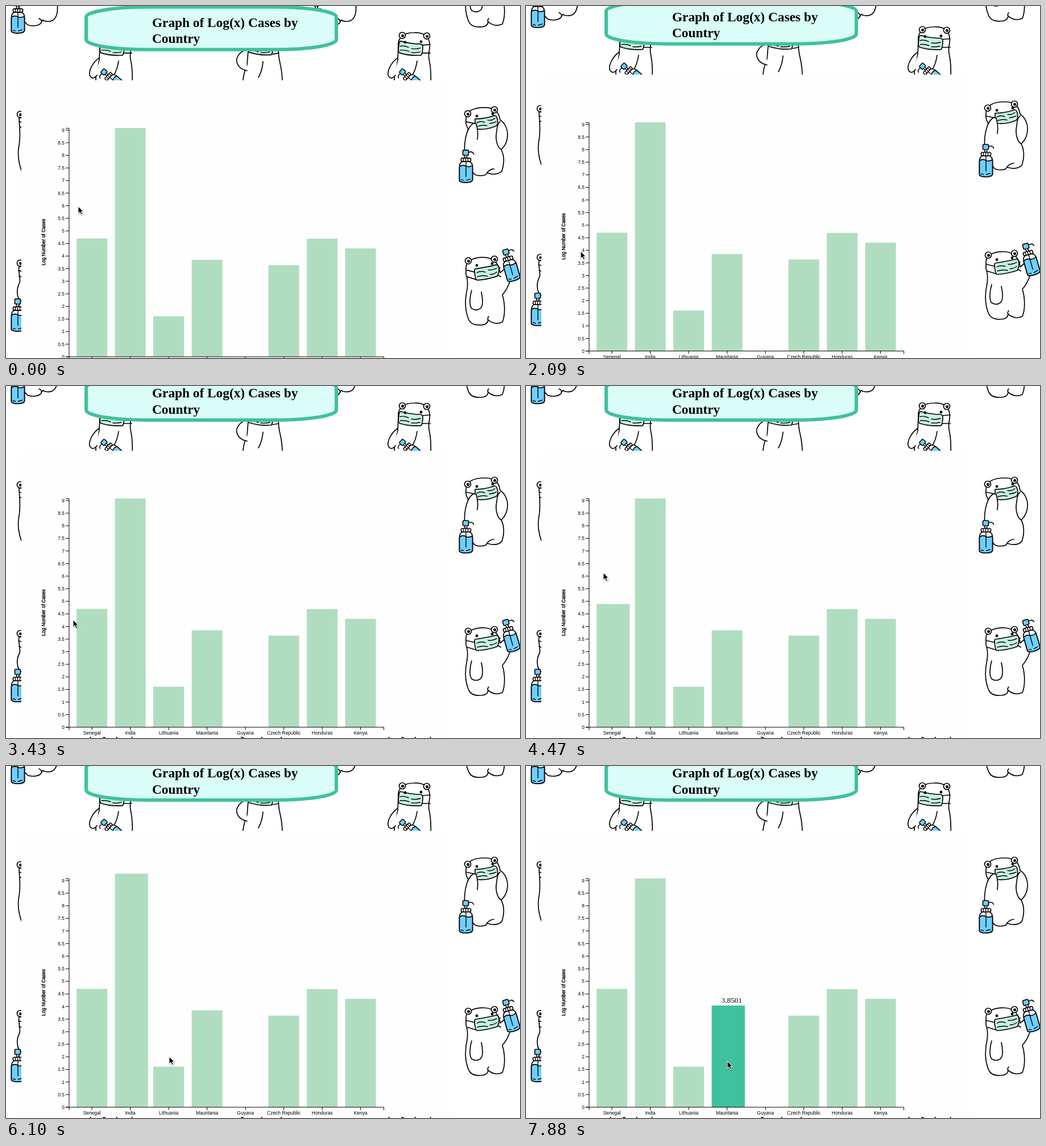
An HTML page for the animation above (8000 ms loop, 904 px wide and 620 px high).

```html
<!DOCTYPE html>
<html lang="en">
<head>
<meta charset="utf-8">
<title>Log cases by country</title>
<style>
  html, body { margin: 0; width: 100%; height: 100%; overflow: hidden; background: #fff; }
  svg { display: block; width: 904px; height: 620px; }
  .ink { fill: #fff; stroke: #000; stroke-width: 1.7; stroke-linecap: round; stroke-linejoin: round; }
  .line { fill: none; }
  .fold { fill: none; stroke-width: 1.4; }
  .blue { fill: #6fcfff; }
  .mask { fill: #c6f0df; }
  .dot { fill: #000; stroke: none; }
  .axis { fill: none; stroke: #000; stroke-width: 1; }
  .small { font: 8.43px "Liberation Sans", Arial, sans-serif; }
  .title { font: bold 23.3px "Liberation Serif", serif; }
  .value { font: 13.3px "Liberation Serif", "Times New Roman", serif; }
  .bold { stroke: #000; stroke-width: .4; }
</style>
</head>
<body>
<svg viewBox="0 0 904 620">
  <defs>
    <g id="bottle" class="ink">
      <path class="line" d="M17 4Q24 1 26 7"/>
      <rect class="blue" x="7" y="0" width="10" height="9" rx="1.500"/>
      <path d="M10.500 9V15H14V9"/>
      <path d="M1 31Q1 21 7 20H18Q24 21 24 31V52Q24 57 12 57T1 52Z"/>
      <path class="blue" d="M1 29Q6 25 12 28T24 27V52Q24 57 12 57T1 52Z"/>
      <rect x="4" y="14" width="17" height="6" rx="2"/>
      <path class="fold" d="M8 15V19M12 15V19M16 15V19M12.500 20V47M4 52L8 53M13 53L20 51"/>
    </g>

    <g id="ear">
      <circle r="5.500"/>
      <circle class="dot" r="2.500" cx=".6" cy=".6"/>
    </g>

    <!-- hands over the mask -->
    <g id="shy" class="ink">
      <path d="M809 184C808 166 826 162 842 162C860 162 867 170 869 184C878 189 883 202 882 212C881 226 875 232 871 236C877 248 876 262 872 274Q862 283 846 277Q845 282 834 282Q824 282 821 276L808 250C804 228 809 210 813 200Q808 192 809 184Z"/>
      <path class="line" d="M809 187L824 190M846 277Q850 271 858 270"/>
      <path class="mask" d="M825 182Q843 182 859 176Q863 176 864 182Q866 190 863 194Q846 202 829 200Q826 199 825 194Z"/>
      <path class="fold" d="M828 189Q834 185 842 188M847 184Q853 186 860 181M830 195Q838 192 846 194M850 190Q856 190 862 187"/>
      <path d="M812 203Q820 186 827 191Q831 205 829 218"/>
      <path d="M871 236C864 232 860 218 863 204Q864 190 869 187"/>
      <circle class="dot" cx="828" cy="177" r="2.400"/>
      <circle class="dot" cx="856" cy="173" r="2.400"/>
      <use href="#ear" x="812" y="173"/>
      <use href="#ear" x="859" y="166"/>
      <use href="#bottle" x="796.500" y="237"/>
    </g>

    <!-- raised bottle -->
    <g id="cheer" class="ink">
      <path d="M809 445C808 430 828 425 842 426C860 427 868 440 869 453L876 447L887 466Q882 482 873 492C878 508 878 528 873 540Q860 546 848 536Q847 545 834 545Q819 546 814 536C807 520 807 500 811 482Q813 466 809 456Z"/>
      <path class="line" d="M809 448L825 452M811 460L827 465M866 446L869 444M865 457L870 460M848 536Q846 533 849 530M819 484C816 494 814 510 819 516Q827 521 834 516Q841 511 836 487"/>
      <path class="mask" d="M826 446Q846 443 862 439Q866 439 867 445Q867 455 864 459Q846 465 829 466Q825 466 824 450Q824 446 826 446Z"/>
      <path class="fold" d="M828 453Q835 449 843 452M848 448Q855 449 863 445M829 460Q838 457 847 459M851 456Q858 456 863 452"/>
      <circle class="dot" cx="828" cy="440" r="2.400"/>
      <circle class="dot" cx="855" cy="437" r="2.400"/>
      <use href="#ear" x="813" y="432"/>
      <use href="#ear" x="859" y="429"/>
      <use href="#bottle" transform="translate(879 416) rotate(-16) translate(-12 -4)"/>
    </g>

    <!-- bottle in the lap -->
    <g id="lap" class="ink">
      <path d="M690 55C688 38 700 30 718 30C740 29 747 42 745 58Q742 70 745 82Q748 98 747 120H683Q682 98 689 78Z"/>
      <path d="M688 75C676 84 669 100 673 107Q678 114 685 105"/>
      <path class="line" d="M733 52L746 51M731 66L746 66M723 80Q721 95 714 106"/>
      <path class="mask" d="M694 45Q712 50 729 50Q733 51 733 55Q733 66 730 70Q708 71 693 66Q690 65 690 60Q691 45 694 45Z"/>
      <path class="fold" d="M693 54Q700 52 708 56M713 58Q720 60 729 57M693 61Q701 60 709 63M713 65Q720 66 728 64"/>
      <circle class="dot" cx="702" cy="47" r="2.400"/>
      <circle class="dot" cx="730" cy="46" r="2.400"/>
      <use href="#ear" x="697" y="35"/>
      <use href="#ear" x="740" y="36"/>
      <use href="#bottle" transform="translate(697 99) rotate(-48) scale(-.9 .9) translate(-12 -4)"/>
    </g>

    <g id="wave" class="ink">
      <path d="M427 50C426 35 440 30 452 30C470 30 480 40 479 58Q479 72 482 84Q486 100 486 120H416Q418 100 424 86Z"/>
      <path d="M422 61C410 63 404 76 406 82Q409 94 424 97"/>
      <path class="line" d="M452 81Q451 96 444 109M469 68L480 66"/>
      <path class="mask" d="M427 48Q448 52 469 50Q471 60 467 69Q446 71 426 64Z"/>
      <path class="fold" d="M430 61Q437 61 444 64M448 65Q456 66 464 64"/>
    </g>

    <g id="stand" class="ink">
      <path d="M23 442C21 450 26 464 24 470C18 482 19 492 23 500C22 515 25 530 35 538Q38 543 47 543Q61 543 63 535Q66 531 66 534Q86 540 90 520C93 500 84 470 82 440Z"/>
      <path class="line" d="M22 449L34 452M23 459L34 462M63 535Q61 531 58 530"/>
      <use href="#ear" x="25" y="436"/>
      <use href="#bottle" x="8.500" y="499"/>
    </g>

    <g id="side" class="ink">
      <path d="M23 180C24 200 26 215 22 235Q20 255 28 275H80V180Z"/>
      <path class="line" d="M23 187L34 189M24 196L34 198"/>
      <use href="#ear" x="25" y="174"/>
    </g>

    <g id="tile">
      <use href="#shy"/><use href="#cheer"/><use href="#lap"/>
      <use href="#wave"/><use href="#stand"/><use href="#side"/>
    </g>

    <filter id="shade" x="-50%" y="-50%" width="220%" height="220%">
      <feDropShadow dx=".5" dy="1.2" stdDeviation="1" flood-opacity=".35"/>
    </filter>
  </defs>

  <g id="page">
    <g id="paper"></g>
    <rect x="27" y="114" width="753" height="504" fill="#fefefe"/>
    <rect x="141" y="-15" width="440" height="75" rx="108" ry="17.500"
      fill="#dafdf7" stroke="#3fc19e" stroke-width="6"/>
    <text class="title" x="257" y="20">Graph of Log(x) Cases by</text>
    <text class="title" x="257" y="48.500">Country</text>
    <g id="bars"></g>
    <g id="axes"></g>
    <text class="small bold" text-anchor="middle" transform="translate(69 399) rotate(-90)">Log Number of Cases</text>
  </g>
  <path id="cursor" filter="url(#shade)" fill="#000" stroke="#fff" stroke-width="1"
    d="M0 0V12.500L3 9.800L5.200 14.600L7.400 13.600L5.300 9H9.200Z"/>
</svg>

<script>
const LOOP = 8000, TICK = 148.65, BASE = 601, UNIT = 44.35, STEP = 67.5, SCROLL = 3.37;
const GROW = 400 / TICK;
const PALE = '#b0ddbf', STRONG = '#3fc19e';

const data = [['Senegal', 4.7005], ['India', 9.0851], ['Lithuania', 1.6094], ['Mauritania', 3.8501],
  ['Guyana', 0], ['Czech Republic', 3.6376], ['Honduras', 4.6913], ['Kenya', 4.3041]];

// hover [enter, leave] per bar, in ticks
const hovers = [[24.3, 29.9], [34.3, 40.9], [43.3, 49.5], [50.2, 99]];
const scrollTicks = [8, 12, 14, 16, 18];
// pointer path: tick, x, y
const path = [[0, 127, 353], [8, 96, 432], [22, 96, 432], [23, 118, 412], [25, 138, 418], [27, 141, 425],
  [28, 141, 425], [29, 139, 394], [30, 136, 329], [32, 168, 330], [34, 193, 372], [36, 219, 440],
  [38, 219, 440], [39, 222, 455], [40, 243, 490], [41, 287, 512], [43, 287, 529], [45, 287, 560],
  [47, 287, 560], [49, 314, 548], [50, 324, 540], [52, 352, 523], [53, 354, 520]];

const $ = id => document.getElementById(id);
function add(parent, tag, attrs, text) {
  const el = document.createElementNS('http://www.w3.org/2000/svg', tag);
  for (const k in attrs) el.setAttribute(k, attrs[k]);
  if (text !== undefined) el.textContent = text;
  return parent.appendChild(el);
}

for (const y of [-525, 0, 525])
  for (const x of [-525, 0, 525]) add($('paper'), 'use', { href: '#tile', x, y });

const bars = data.map(([name, value], i) => {
  const x = 124.1 + i * STEP, mid = x + 27;
  add($('axes'), 'path', { class: 'axis', d: `M${mid} ${BASE}v5` });
  add($('axes'), 'text', { class: 'small', x: mid, y: 614, 'text-anchor': 'middle' }, name);
  const rect = add($('bars'), 'rect', { x });
  const label = add($('bars'), 'text',
    { class: 'value', x: x + 17, y: BASE - value * UNIT - 13 }, value.toFixed(4));
  return { rect, label, value };
});

add($('axes'), 'path', { class: 'axis', d: 'M105 198.500H111V601H105M111 606V601H664.500V606' });
for (let i = 0; i <= 18; i++) {
  const y = BASE - i * UNIT / 2;
  add($('axes'), 'path', { class: 'axis', d: `M105 ${y}h6` });
  add($('axes'), 'text', { class: 'small', x: 103, y: y + 3, 'text-anchor': 'end' }, i / 2);
}

const clamp = v => Math.min(1, Math.max(0, v));
const ease = v => v < .5 ? 4 * v ** 3 : 1 - 4 * (1 - v) ** 3;

function pointer(k) {
  const n = path.findIndex(p => p[0] >= k);
  if (n < 1) return path[n < 0 ? path.length - 1 : 0].slice(1);
  const [t0, x0, y0] = path[n - 1], [t1, x1, y1] = path[n];
  const f = (k - t0) / (t1 - t0);
  return [x0 + (x1 - x0) * f, y0 + (y1 - y0) * f];
}

function draw(ms) {
  const k = Math.floor(ms / TICK);
  const left = scrollTicks.filter(t => t > k).length;
  $('page').setAttribute('transform', `translate(0 ${left * SCROLL})`);
  $('cursor').setAttribute('transform', `translate(${pointer(k)})`);
  bars.forEach(({ rect, label, value }, i) => {
    const [enter, leave] = hovers[i] || [999, 999];
    const on = k >= enter && k < leave;
    const size = ease(clamp((k - enter) / GROW)) - ease(clamp((k - leave) / GROW));
    const height = value * UNIT + 8.4 * size;
    rect.setAttribute('y', BASE - height);
    rect.setAttribute('height', height);
    rect.setAttribute('width', 54 + 4.3 * size);
    rect.setAttribute('fill', on ? STRONG : PALE);
    label.setAttribute('visibility', on ? 'visible' : 'hidden');
  });
}

const start = performance.now();
function frame() {
  draw((performance.now() - start) % LOOP);
  requestAnimationFrame(frame);
}
frame();
</script>
</body>
</html>
```
